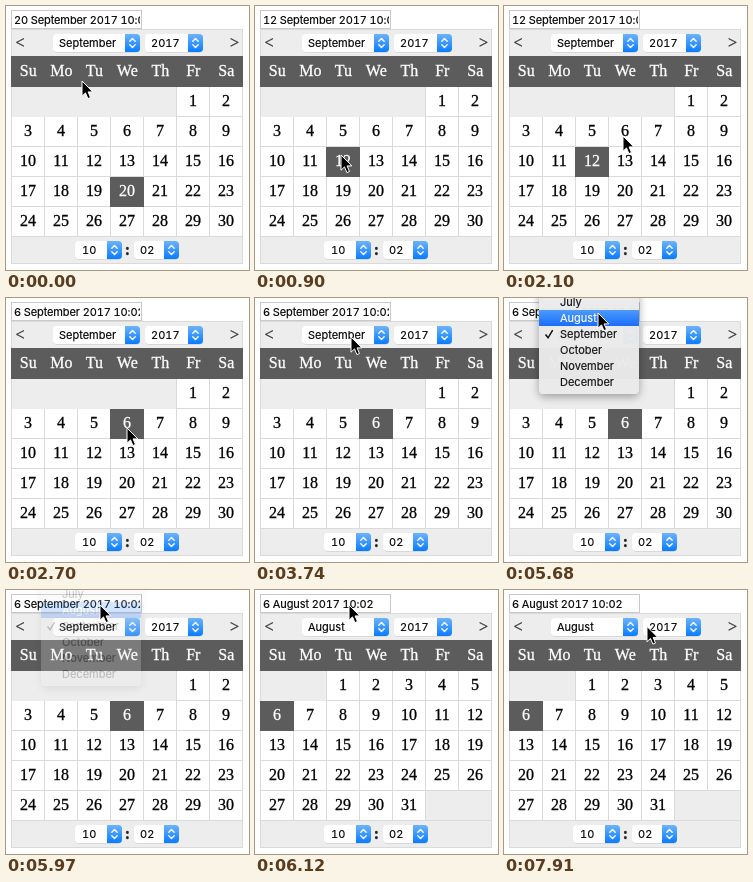
Recreate the animation shown at these times as an HTML page. Size 243 px wide and 264 px high, loop 8 s.

```html
<!DOCTYPE html>
<html lang="en">
<head>
<meta charset="utf-8">
<title>Date picker</title>
<style>
  html, body { margin: 0; width: 100%; height: 100%; overflow: hidden; background: #fff; }
  svg { display: block; width: 100vw; height: 100vh; }
  text { fill: currentColor; stroke: currentColor; stroke-width: .15; }
  .ui { font: 11px Inter, Roboto, sans-serif; font-variant-numeric: tabular-nums; }
  .day { font: 16px "Liberation Serif", "Noto Serif", serif; text-anchor: middle; stroke-width: .3; }
  .field { letter-spacing: -.12px; }
  .colon { font-weight: bold; }
</style>
</head>
<body>
<svg id="stage" viewBox="0 0 243 264" xmlns="http://www.w3.org/2000/svg">
  <defs>
    <linearGradient id="blue" x2="0" y2="1">
      <stop stop-color="#6cb3fa"/><stop offset="1" stop-color="#087cff"/>
    </linearGradient>
    <linearGradient id="hover" x2="0" y2="1">
      <stop stop-color="#4c9bfd"/><stop offset="1" stop-color="#1a6dfa"/>
    </linearGradient>
    <clipPath id="field"><rect x="6" y="6" width="128" height="15"/></clipPath>
    <filter id="shadow" x="-20%" y="-20%" width="140%" height="140%">
      <feDropShadow dx="0" dy="3" stdDeviation="4" flood-opacity=".35"/>
    </filter>
  </defs>
  <g id="page"></g>
  <g id="menu"></g>
  <path id="cursor" d="M0 0V15.2L3.5 11.9L5.9 17.6L8.5 16.5L6.1 10.9H10.8Z"
        fill="#000" stroke="#fff" stroke-width="1" stroke-linejoin="round"/>
</svg>
<script>
const LOOP = 8000;
const COL = 33, ROW = 30, LEFT = 6, TOP = 81;
const GREY = '#ededed', LINE = '#dadada', DARK = '#5c5c5c';
const MONTHS = {
  September: { start: 5, days: 30 },
  August: { start: 2, days: 31 }
};

// Each step: [start time, ...values held until the next step]
const cursorSteps = [
  [0, 76, 75], [150, 62, 133], [300, 70, 133], [450, 85, 147], [600, 86, 149],
  [1950, 97, 146], [2100, 119, 130], [2250, 121, 130],
  [3300, 111, 95], [3450, 99, 55], [3600, 95, 40], [3740, 96, 39],
  [4940, 93, 31], [5080, 92, 20], [5230, 94, 15],
  [7620, 93, 10], [7770, 120, 25], [7910, 143, 36.5]
];
const dateSteps = [
  [0, 20, 'September'], [900, 12, 'September'], [2700, 6, 'September'], [6120, 6, 'August']
];
const menuSteps = [
  [0, 0, 2], [4190, 1, 2], [5080, 1, 1], [5820, .55, 1], [5970, .22, 1], [6120, 0, 1]
];

const $ = id => document.getElementById(id);
const at = (steps, t) => steps.filter(s => s[0] <= t).pop().slice(1);
const rect = (x, y, w, h, fill, more = '') =>
  `<rect x="${x}" y="${y}" width="${w}" height="${h}" fill="${fill}" ${more}/>`;
const text = (x, y, str, cls = 'ui', color = '#000', more = '') =>
  `<text x="${x}" y="${y}" class="${cls}" color="${color}" ${more}>${str}</text>`;

function select(x, y, w, label, labelX) {
  const r = x + w, c = r - 7.5;
  return rect(x, y + .5, w, 18, '#000', 'rx="4" opacity=".18"')
    + rect(x, y, w, 18, '#fff', 'rx="3.5"')
    + `<path d="M${r - 15} ${y}h11.5q3.5 0 3.5 3.5v11q0 3.5-3.5 3.5h-11.5z" fill="url(#blue)"/>`
    + `<path d="M${c - 2.7} ${y + 7.2}l2.7-2.7 2.7 2.7M${c - 2.7} ${y + 10.8}l2.7 2.7 2.7-2.7"
        fill="none" stroke="#fff" stroke-width="1.4" stroke-linecap="round" stroke-linejoin="round"/>`
    + text(labelX, y + 13, label);
}

function cells(day, month) {
  const { start, days } = MONTHS[month];
  let out = '';
  for (let i = start; i < start + days; i++) {
    const n = i - start + 1, on = n === day;
    const x = LEFT + i % 7 * COL, y = TOP + Math.floor(i / 7) * ROW;
    out += rect(x, y, COL, ROW, LINE)
      + rect(x, y, COL - 1, ROW - 1, '#fff')
      + (on ? rect(x - 1, y, COL + 1, ROW, DARK) : '')
      + text(x + 16, y + 19, n, 'day', on ? '#fff' : '#000');
  }
  return out + rect(LEFT + start * COL - 1, TOP, 1, ROW, LINE);
}

function page(day, month) {
  const names = ['Su', 'Mo', 'Tu', 'We', 'Th', 'Fr', 'Sa'];
  return rect(5.5, 4.5, 130, 18, '#fff', 'stroke="#c9c9c9"')
    + text(8, 18, `${day} ${month} 2017 10:02`, 'ui field', '#000', 'clip-path="url(#field)"')
    + rect(5.5, 23.5, 231, 234, GREY, `stroke="${LINE}"`)
    + text(14, 42, '&lt;', 'day', '#333')
    + text(228.5, 42, '&gt;', 'day', '#333')
    + select(47, 28, 87, month, 53)
    + select(139, 28, 58, '2017', 145)
    + rect(5, 50, 232, 31, DARK)
    + names.map((n, i) => text(LEFT + 16.3 + i * COL, 70, n, 'day', '#fff')).join('')
    + cells(day, month)
    + rect(5, 230, 232, 1, LINE)
    + select(69, 235, 47, '10', 76)
    + text(121.5, 249, ':', 'day colon', '#222')
    + select(128, 235, 45, '02', 134);
}

function menu(hover) {
  const items = ['July', 'August', 'September', 'October', 'November', 'December'];
  const ink = i => i === hover ? '#fff' : '#111';
  return '<path d="M35-12H135V91q0 5-5 5H40q-5 0-5-5z" fill="#ececec" fill-opacity=".96" filter="url(#shadow)"/>'
    + rect(35, 16 * hover - 4, 100, 16, 'url(#hover)')
    + items.map((n, i) => text(56, 16 * i + 8, n, 'ui', ink(i))).join('')
    + `<path d="M41.5 36.5l2.6 3.3 4.6-7.6" fill="none" stroke="${ink(2)}" stroke-width="1.5"/>`;
}

let lastDate = '', lastHover = -1;

function draw(t) {
  const [x, y] = at(cursorSteps, t);
  const [day, month] = at(dateSteps, t);
  const [alpha, hover] = at(menuSteps, t);
  if (day + month !== lastDate) {
    $('page').innerHTML = page(day, month);
    lastDate = day + month;
  }
  if (hover !== lastHover) {
    $('menu').innerHTML = menu(hover);
    lastHover = hover;
  }
  $('menu').setAttribute('opacity', alpha);
  $('cursor').setAttribute('transform', `translate(${x} ${y})`);
}

const began = performance.now();
function tick() {
  draw((performance.now() - began) % LOOP);
  requestAnimationFrame(tick);
}
tick();
</script>
</body>
</html>
```
